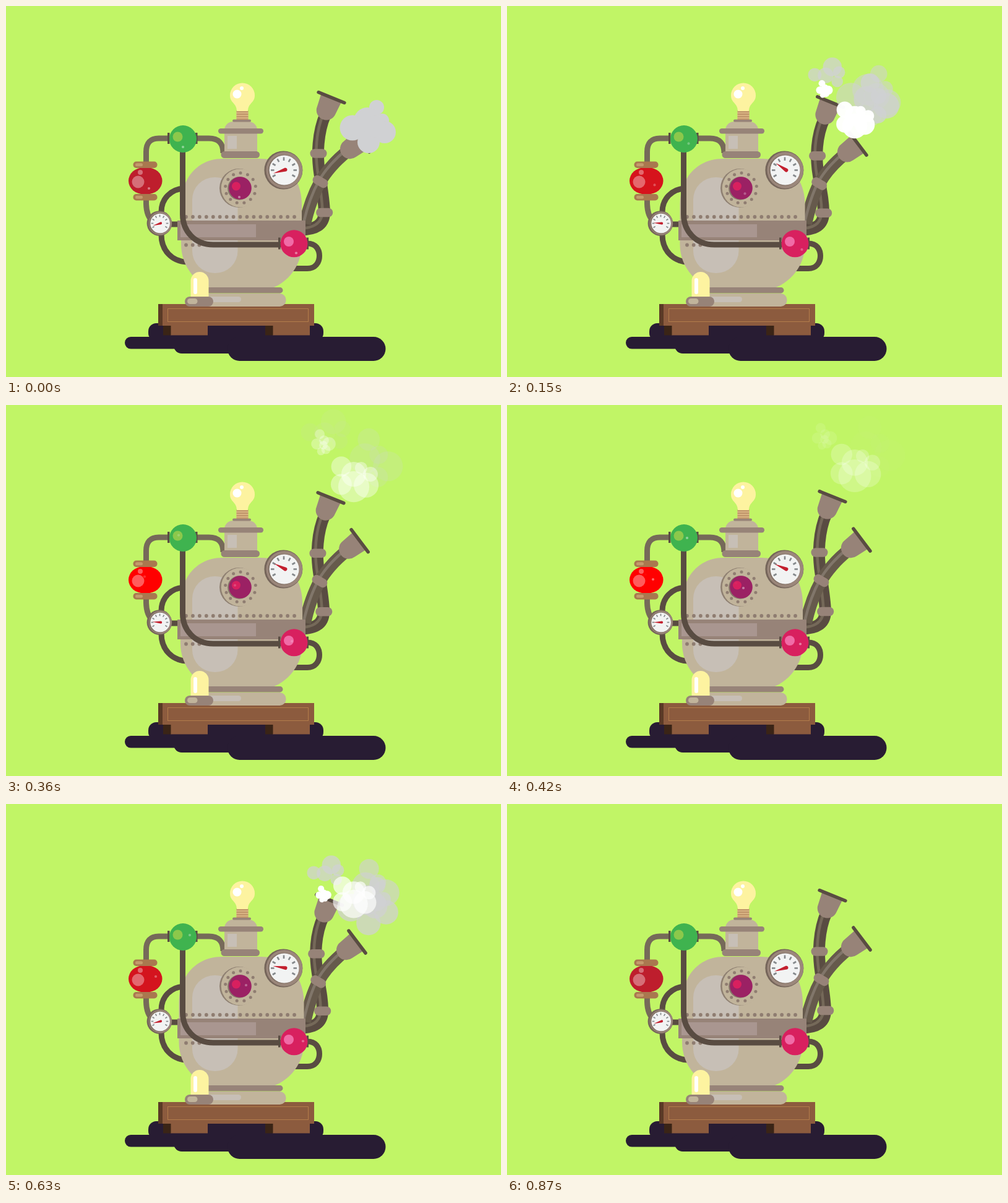
These frames come from a looping animation (800x600 px, 900 ms). An HTML page:

```html
<!DOCTYPE html>
<html lang="en">
<head>
<meta charset="utf-8">
<title>Steam machine</title>
<style>
html, body { margin: 0; width: 100%; height: 100%; overflow: hidden; background: #c1f566; }
svg { display: block; width: 800px; height: 600px; }
.pipe { fill: none; stroke: #594c42; stroke-width: 9; }
.pale { stroke: #766a59; }
.tan { fill: #c1b49b; }
.metal { fill: #978378; }
.wood { fill: #8c5b3e; }
.shine { fill: #c7bfb6; }
.bulb { fill: #fdf3a0; }
.copper { fill: #a9784f; }
.dark { fill: #594c42; }
.rivet { fill: #8f7d71; }
.tick { stroke: #85898c; }
</style>
</head>
<body>
<svg viewBox="0 0 800 600">
  <rect width="800" height="600" fill="#c1f566"/>

  <g fill="#281c33">
    <rect x="230" y="513" width="283" height="29" rx="13"/>
    <rect x="192" y="535" width="130" height="19.5" rx="9.7"/>
    <rect x="271" y="535" width="140" height="27" rx="13"/>
    <rect x="358" y="535" width="255.500" height="39" rx="19.500"/>
  </g>

  <rect class="wood" x="246" y="482" width="252" height="35"/>
  <rect x="246" y="482" width="7" height="35" fill="#5a3a26"/>
  <rect x="261.500" y="489.500" width="227" height="21" fill="none" stroke="#b37d4b"/>
  <path class="wood" d="M266 517h60v15.500h-60zM431 517h60v15.500h-60z"/>
  <path fill="#3a2416" d="M254 517h12.500v15.500h-12.500zM419 517h12.500v15.500h-12.500z"/>

  <path class="pipe" id="low1" style="stroke-width:19"/>
  <path class="pipe" id="low1s" style="stroke:#756959;stroke-width:4.500"/>
  <rect class="metal" id="j1" x="-13.500" y="-7.300" width="27" height="14.600" rx="7"/>
  <rect class="metal" id="j3" x="-13.500" y="-7.300" width="27" height="14.600" rx="7"/>
  <path class="pipe" id="low2" style="stroke:#665a4c;stroke-width:20"/>
  <path class="pipe" id="low2s" style="stroke:#81766a;stroke-width:4.500"/>
  <rect class="metal" id="j2" x="-13" y="-7.300" width="26" height="14.600" rx="7"/>
  <g id="horn1"></g>
  <g id="horn2"></g>

  <path class="pipe" d="M288 295C266 296 251 312 251 333V370C251 395 268 413 292 414"/>
  <path class="pipe" d="M264 353h16"/>
  <path class="pipe" d="M487 384C501 384 506.500 394 506.500 404C506.500 415 500 424.500 487 424.500H460"/>
  <path class="pipe pale" d="M263 214H247Q226.500 214 226.500 236V253M226.500 312V320Q227 340 237 348"/>
  <path class="pipe pale" d="M307 214H328Q351 214 351 238"/>

  <path class="tan" id="body" d="M283 347V322C283 276 312 247 350 247H411C449 247 478 276 478 322V385C478 424 450 455 415 460H346C311 455 283 424 283 385Z"/>
  <rect class="shine" x="301" y="277" width="73.500" height="155" rx="36"/>
  <rect class="tan" x="310" y="465" width="142.500" height="21" rx="10"/>
  <rect class="shine" x="320" y="470" width="60" height="9" rx="4.500"/>
  <rect class="metal" x="320" y="455" width="127.500" height="9.500" rx="4.700"/>
  <g class="rivet" id="rivets"></g>
  <rect class="metal" x="277" y="347" width="207" height="32"/>
  <rect x="282" y="353" width="122" height="21" fill="#a99690"/>

  <rect class="tan" x="353" y="187" width="53" height="30" rx="14"/>
  <rect class="tan" x="353" y="204" width="53" height="34"/>
  <rect class="shine" x="358" y="210" width="15" height="21"/>
  <rect class="metal" x="343" y="198" width="73" height="8.500" rx="4.200"/>
  <rect class="metal" x="347.500" y="235" width="62.500" height="11" rx="5.500"/>
  <rect class="metal" x="366" y="183.500" width="30" height="4" rx="2"/>
  <path fill="#c0956a" d="M372.500 169h19v15h-19z"/>
  <path stroke="#e0bd8b" stroke-width="1.500" d="M372 173h20M372 177h20M372 181h20"/>
  <path class="bulb" d="M373 170C373 157 362 157 362 144.500A20 20 0 0 1 402 144.500C402 157 391 157 391 170Z"/>
  <circle cx="373.500" cy="142.500" r="7" fill="#fff"/>
  <circle cx="381" cy="133" r="3" fill="#fff"/>

  <circle cx="376.500" cy="294.500" r="31.500" fill="#8f8072"/>
  <circle class="tan" cx="378.700" cy="294.500" r="31"/>
  <g class="rivet" id="studs"></g>
  <circle cx="376.800" cy="295" r="18.700" fill="#87786b"/>
  <circle cx="378.500" cy="294.500" r="18.300" fill="#9b2164"/>
  <circle cx="372" cy="291.500" r="7" fill="#d8205f"/>

  <g id="big"></g>
  <g id="small"></g>

  <path class="pipe" d="M285.500 230V337C285.500 364 305 386 335 386H444"/>
  <path class="dark" d="M261 205h3.500v18h-3.500zM306 205h3.500v18h-3.500zM440 374.500h3.500v19h-3.500zM485.500 374.500h3.500v19h-3.500z"/>
  <circle cx="286" cy="215" r="22" fill="#3fb34f"/>
  <circle cx="277.500" cy="211.500" r="8" fill="#8cc84b"/>
  <circle cx="465.500" cy="384.300" r="22" fill="#d8205f"/>
  <circle cx="457" cy="381" r="8" fill="#f06ca7"/>
  <rect id="red" x="198" y="261" width="54.500" height="43.500" rx="25" ry="21.700"/>
  <circle cx="213.500" cy="284.500" r="10" fill="#fff" opacity=".36"/>
  <circle cx="217" cy="269" r="4" fill="#fff" opacity=".36"/>
  <rect class="copper" x="205.500" y="251.500" width="39" height="10.500" rx="5"/>
  <rect class="copper" x="205.500" y="304" width="39" height="10.500" rx="5"/>
  <path stroke="#c49a6c" stroke-width="5" stroke-linecap="round" d="M211.500 256.700h7M211.500 309.200h7"/>

  <path class="bulb" d="M298.500 472V444.500A14.500 14.500 0 0 1 327.500 444.500V472Z"/>
  <rect x="303" y="440" width="6" height="26" rx="3" fill="#fff"/>
  <rect class="metal" x="289" y="470" width="46" height="16" rx="8"/>
  <rect x="293" y="473" width="16.500" height="9" rx="4.500" fill="#c1b49b"/>

  <g id="bubbles" fill="#fff"></g>
  <g id="smoke"></g>
</svg>
<script>
const LOOP = 900, STEP = 30;
const $ = id => document.getElementById(id);
const set = (node, attrs) => { for (const k in attrs) node.setAttribute(k, attrs[k]); };
function add(parent, tag, attrs) {
  const node = document.createElementNS('http://www.w3.org/2000/svg', tag);
  set(node, attrs);
  return parent.appendChild(node);
}

// Cosine-eased value through [time, value] keys
function track(keys, t) {
  let i = 1;
  while (i < keys.length - 1 && t > keys[i][0]) i++;
  const [t0, a] = keys[i - 1], [t1, b] = keys[i];
  const u = Math.min(1, Math.max(0, (t - t0) / (t1 - t0)));
  return a + (b - a) * (1 - Math.cos(Math.PI * u)) / 2;
}

const swell = [[0, 0], [170, 1], [230, 1], [435, 0], [620, .95], [640, .95], [870, 0]];
const heat = [[0, 0], [360, 1], [400, 1], [780, 0], [870, 0]];
const bigDial = [[0, -17], [150, 34], [360, 27], [510, 17], [630, 9], [750, 21], [870, -17]];
const smallDial = [[0, -17], [150, 3], [360, 3], [510, -5], [630, -14], [750, -14], [870, -17]];

for (let i = 0; i < 17; i++) add($('rivets'), 'circle', { cx: 291 + i * 10.94, cy: 341, r: 2.9 });
for (let i = 0; i < 3; i++) add($('rivets'), 'circle', { cx: 291 + i * 10.7, cy: 386.5, r: 2.9 });
for (let i = 0; i < 13; i++) {
  const a = i / 13 * 2 * Math.PI;
  add($('studs'), 'circle', { cx: 379 + 24.5 * Math.sin(a), cy: 294.5 - 24.5 * Math.cos(a), r: 2.5 });
}

for (const id of ['horn1', 'horn2']) {
  add($(id), 'path', { class: 'metal', d: 'M-17.500 2H17.500L16 22A16 16 0 0 1 -16 22Z' });
  add($(id), 'path', { d: 'M-22.500 0H22.500', stroke: '#594c42', 'stroke-width': 5.5, 'stroke-linecap': 'round' });
}

function dial(id, x, y, r, face) {
  const g = $(id), k = face / 24;
  set(g, { transform: `translate(${x} ${y})` });
  add(g, 'circle', { cx: -.6, r, fill: '#75655a' });
  add(g, 'circle', { cx: .8, r: r - 1.6, fill: '#9b877b' });
  add(g, 'circle', { r: face + 1, cx: -.3, fill: '#806f64' });
  add(g, 'circle', { r: face, cx: .6, fill: '#f2f3f3' });
  for (let a = -30; a <= 210; a += 30)
    add(g, 'path', { class: 'tick', 'stroke-width': 2.6 * k, d: `M${-21 * k} 0h${5.5 * k}`, transform: `rotate(${a})` });
  return add(g, 'path', { fill: '#c31f2e', d: `M${-19.5 * k} 0L${k} ${-3 * k}A${3 * k} ${3 * k} 0 0 1 ${k} ${3 * k}Z` });
}
const bigNeedle = dial('big', 449, 265.5, 31, 24);
const smallNeedle = dial('small', 248.5, 351.5, 20.3, 15.8);

// Bubbles: [x, y, birth, life], shared by the four orbs
const orbs = [[286, 215], [231, 282], [469, 386.5], [377, 296]];
const bubbles = [[0, 13, 0, 130], [7.5, 11, 90, 170], [-7, 1, 270, 160], [5, 0, 420, 170], [11, 0, 580, 210]];
const dots = orbs.map(() => bubbles.map(() => add($('bubbles'), 'circle', { r: 2.1 })));

// Clouds: puffs are [dx, dy, r] around a rising centre; births are [time, life]
const clouds = [
  { fill: '#d0d1d3', x: 588, y: 195, v: .33, acc: 0, s0: 1, s1: 1.34, gain: 1, births: [[0, 330], [540, 330]],
    puffs: [[11, -31, 12], [-4, -9, 22], [-28, 2, 20.5], [20, -10, 11], [24, 9, 18], [-2, 25, 18], [8, 0, 18]] },
  { fill: '#d0d1d3', x: 590, y: 183, v: .3, acc: 0, s0: .98, s1: 1.3, gain: 1, births: [[60, 370], [480, 390]],
    puffs: [[-3, -30, 14.5], [-8, -5, 20], [22, 5, 19.5], [10, -10, 12], [9, 19, 13]] },
  { fill: '#d0d1d3', x: 516, y: 140, v: .32, acc: 0, s0: .84, s1: 1.36, gain: 1, births: [[60, 330], [540, 330]],
    puffs: [[10, -13, 15.5], [-19, 0, 11], [-1, 1, 13], [21, -4, 10], [18, 11, 9.5]] },
  { fill: '#fff', x: 562, y: 184, v: .31, acc: 0, s0: 1, s1: 1.42, gain: 1, births: [[140, 360], [510, 360]],
    puffs: [[-16, -13, 13], [-16, 10, 13.5], [9.5, -11, 8], [21.5, -3, 9.5], [0, -3, 16], [0, 13, 20], [16, 11, 16]] },
  { fill: '#fff', x: 513, y: 157, v: .551, acc: .0007, s0: .58, s1: 1.02, gain: 1.15, births: [[110, 340], [612, 258]],
    puffs: [[-6, -16, 8], [-11, 0, 9], [9, 0, 11], [1, -6, 8], [4, 9, 7.5], [-4, 12, 6.5], [0, 2, 7]] }
];
for (const c of clouds)
  c.groups = c.births.map(() => c.puffs.map(() => add($('smoke'), 'circle', { fill: c.fill })));

function drawCloud(c, t) {
  c.births.forEach(([birth, life], n) => {
    const age = t - birth, u = age / life, on = u >= 0 && u < 1;
    const grow = c.acc ? 1 - (1 - u) ** 2 : u;
    const s = c.s0 + (c.s1 - c.s0) * grow;
    const y = c.y - c.v * age + c.acc * age * age;
    c.puffs.forEach(([dx, dy, r], i) => set(c.groups[n][i], on
      ? { cx: c.x + dx * s, cy: y + dy * s, r: r * s, opacity: Math.min(1, c.gain * (1 - u)) }
      : { opacity: 0 }));
  });
}

function drawPipes(p) {
  const pt = (x, y, dx, dy) => `${x + dx * p} ${y + dy * p}`;
  const d1 = `M${pt(516, 176, -3.5, 7)}C${pt(504, 204, -4, 6)} ${pt(502, 240, -4, 4)} ${pt(507, 272, -3.5, 3)}` +
    `S${pt(514, 315, -3, 1)} ${pt(514.5, 334, -3, .5)}C${pt(514, 355, -3, 0)} 498 362 474 362`;
  const d2 = `M${pt(553, 234, -6, 5)}C${pt(532, 250, -5, 5)} ${pt(516, 270, -4, 4)} ${pt(508, 284, -3.5, 3.5)}` +
    `C${pt(498, 302, -2, 2)} 490 322 483 352`;
  set($('low1'), { d: d1 });
  set($('low1s'), { d: d1, transform: 'translate(-3 -2)' });
  set($('low2'), { d: d2 });
  set($('low2s'), { d: d2, transform: 'translate(-2 -2)' });
  set($('j1'), { transform: `translate(${pt(505, 238.5, -3.5, 4)})` });
  set($('j2'), { transform: `translate(${pt(508, 284, -3.5, 3.5)}) rotate(30)` });
  set($('j3'), { transform: `translate(${pt(514.7, 334, -3.2, .8)})` });
  set($('horn1'), { transform: `translate(${pt(526, 148, -3.5, 7.5)}) rotate(22)` });
  set($('horn2'), { transform: `translate(${pt(573.5, 218, -6.3, 5.3)}) rotate(53)` });
}

function draw(t) {
  const p = track(swell, t), h = track(heat, t);
  const mix = (a, b) => Math.round(a + (b - a) * h);
  drawPipes(p);
  set($('body'), { transform: `translate(380.500 0) scale(${1 + .038 * p} 1) translate(-380.500 0)` });
  set($('red'), { fill: `rgb(${mix(190, 255)},${mix(30, 0)},${mix(45, 0)})` });
  set(bigNeedle, { transform: `translate(1.500 -.5) rotate(${track(bigDial, t)})` });
  set(smallNeedle, { transform: `translate(1 0) rotate(${track(smallDial, t)})` });
  orbs.forEach(([x, y], n) => bubbles.forEach(([bx, by, birth, life], i) => {
    const age = t - birth, on = age >= 0 && age < life;
    set(dots[n][i], { cx: x + bx, cy: y + by - .06 * age, opacity: on ? .42 * (1 - age / life) : 0 });
  }));
  clouds.forEach(c => drawCloud(c, t));
}

const start = performance.now();
function tick() {
  const t = (performance.now() - start) % LOOP;
  draw(Math.floor(t / STEP) * STEP);
  requestAnimationFrame(tick);
}
draw(0);
requestAnimationFrame(tick);
</script>
</body>
</html>
```
